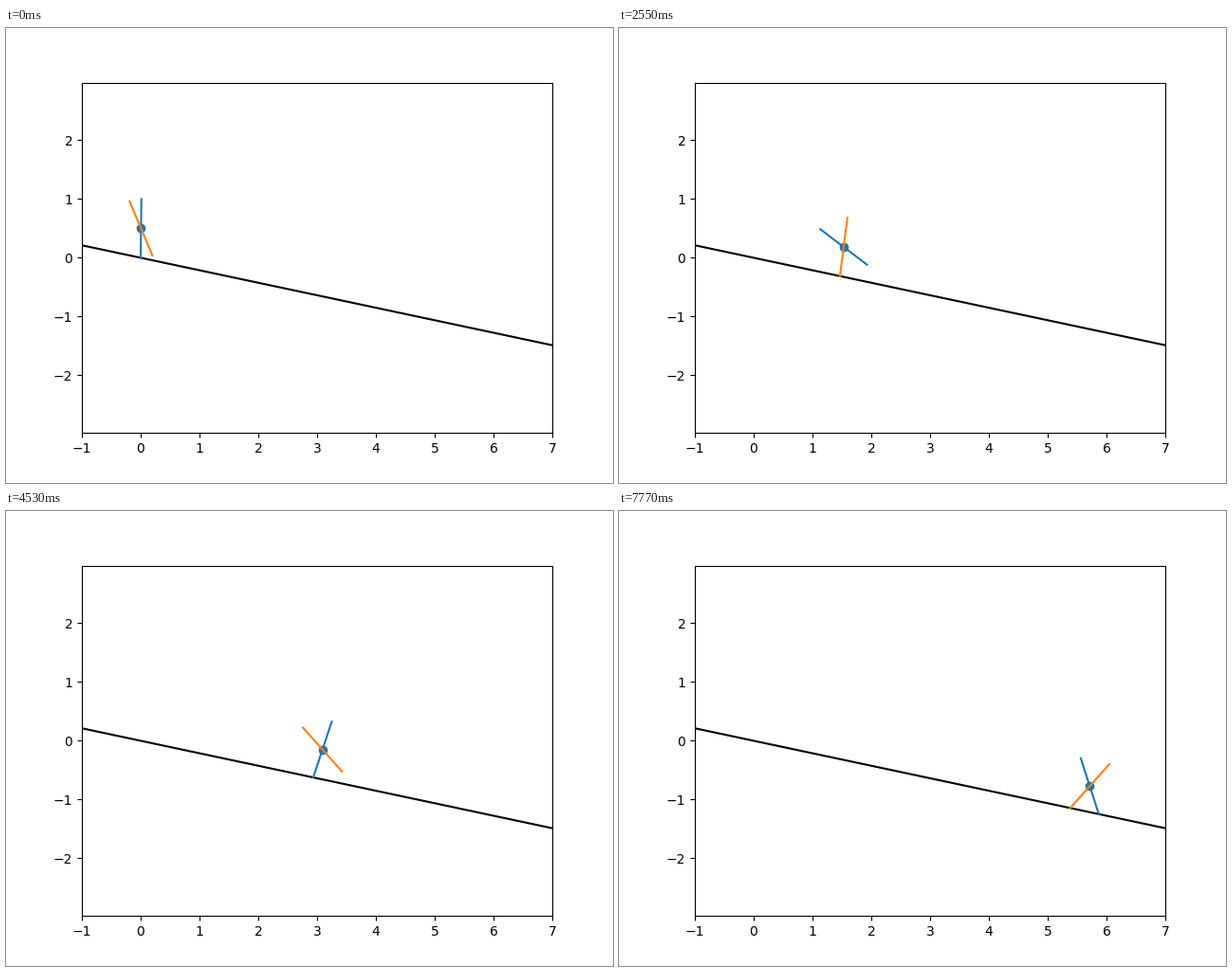
Animation, 640 px wide and 480 px high, one loop 7800 ms. Source, as a matplotlib script:

```python
import numpy as np
import matplotlib.pyplot as plt
from matplotlib.animation import FuncAnimation

FRAMES, INTERVAL = 260, 30
LEG = 0.5                    # hub to foot
SLOPE = np.radians(12)
SPREAD = np.pi / 3           # locked angle between the legs
OMEGA = 5.0                  # inverted pendulum rate
SWING = 6.97                 # swing leg speed, rad/s
LEAN_IN = SLOPE - SPREAD / 2
LEAN_OUT = SLOPE + SPREAD / 2


def lean_at(lean, speed, t):
    return lean * np.cosh(OMEGA * t) + speed / OMEGA * np.sinh(OMEGA * t)


def touchdown(lean, speed):
    """Time until the stance leg reaches LEAN_OUT."""
    a, b = (lean + speed / OMEGA) / 2, (lean - speed / OMEGA) / 2
    return np.log((LEAN_OUT + np.sqrt(LEAN_OUT**2 - 4 * a * b)) / (2 * a)) / OMEGA


def walk():
    """Steps as (start time, lean, speed, leg angle)."""
    t, lean, speed, gap = 0.0, 0.012, 0.019, 0.41
    steps = []
    while t < FRAMES * INTERVAL / 1000:
        steps.append((t, lean, speed, gap))
        t += touchdown(lean, speed)
        impact = np.sqrt(speed**2 + OMEGA**2 * (LEAN_OUT**2 - lean**2))
        lean, speed, gap = LEAN_IN, impact * np.cos(SPREAD), -SPREAD
    return steps


STEPS = walk()


def pose(t):
    k = max(i for i, step in enumerate(STEPS) if step[0] <= t)
    start, lean, speed, gap = STEPS[k]
    stance = lean_at(lean, speed, t - start)
    swing = stance - min(gap + SWING * (t - start), SPREAD)
    foot = k * LEG * np.array([np.cos(SLOPE), -np.sin(SLOPE)])
    hub = foot + LEG * np.array([np.sin(stance), np.cos(stance)])
    return hub, (stance, swing) if k % 2 == 0 else (swing, stance)


fig, ax = plt.subplots(figsize=(6.4, 4.8), dpi=100)
half = 4 * 369.6 / 496       # equal scale on both axes
ax.set_xlim(-1, 7)
ax.set_ylim(-half, half)
ax.set_xticks(range(-1, 8))
ax.set_yticks(range(-2, 3))

ground = np.array([-2, 8])
ax.plot(ground, -np.tan(SLOPE) * ground, color="black")
blue, = ax.plot([], [], color="C0")
dot, = ax.plot([], [], "o", color="C0")
orange, = ax.plot([], [], color="C1")


def update(i):
    hub, leans = pose(i * INTERVAL / 1000)
    for line, lean in zip((blue, orange), leans):
        arm = LEG * np.array([np.sin(lean), np.cos(lean)])
        line.set_data(*np.column_stack([hub - arm, hub + arm]))
    dot.set_data([hub[0]], [hub[1]])
    return blue, dot, orange


anim = FuncAnimation(fig, update, frames=FRAMES, interval=INTERVAL,
                     repeat=True, repeat_delay=0)
plt.show()
```
